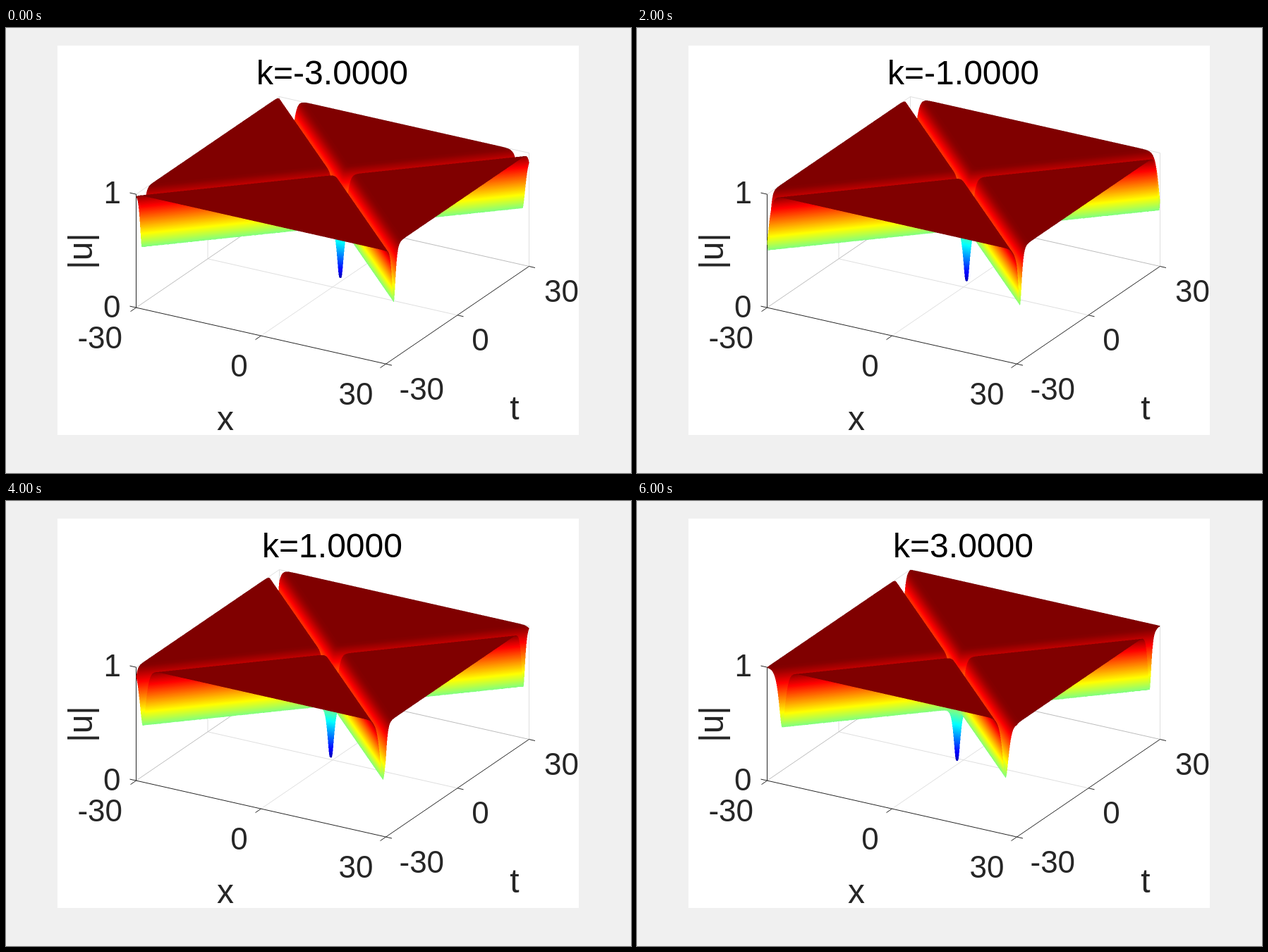
Write an HTML page with a canvas that moves like this. It is 886 px wide and 632 px high and loops after 6100 ms.

```html
<!DOCTYPE html>
<html>
<head>
<meta charset="utf-8">
<style>
html, body { margin: 0; width: 100%; height: 100%; overflow: hidden; background: #f0f0f0; }
canvas { display: block; }
</style>
</head>
<body>
<canvas id="stage" width="886" height="632"></canvas>
<script>
const ctx = document.getElementById('stage').getContext('2d');

// Orthographic view: pixels per unit of x, t and z around the floor centre
const CX = 463, CY = 367.8, R = 30;
const XX = 5.9, XY = 1.3333, TX = 3.3833, TY = -2.31, ZY = 161;
const project = (x, t, z = 0) => [CX + XX * x + TX * t, CY + XY * x + TY * t - ZY * z];

// Surface layer, rendered at double size for smooth edges
const SCALE = 2, LEFT = 180, TOP = 90, W = 566 * SCALE, H = 312 * SCALE;
const layer = document.createElement('canvas');
layer.width = W;
layer.height = H;
const layerCtx = layer.getContext('2d');
const image = layerCtx.createImageData(W, H);
const pixels = new Uint32Array(image.data.buffer);

const jet = Uint32Array.from({ length: 256 }, (_, i) => {
  const channel = peak => Math.round(255 * Math.max(0, Math.min(1, 1.5 - Math.abs(4 * i / 255 - peak))));
  return (255 << 24 | channel(1) << 16 | channel(2) << 8 | channel(3)) >>> 0;
});
const colour = z => jet[Math.max(0, Math.min(255, Math.round(z * 255)))];

// Height of two crossing dark solitons, from their exponentials
function height(e1, e2) {
  const p = e1 * e2 / 4, d = 1 + e1 + e2 + p;
  const re = (1 + p - (e1 + e2) / 2) / d, im = Math.sqrt(3) / 2 * (e1 - e2) / d;
  return Math.sqrt(re * re + im * im);
}

// Each screen column is a slice of the surface, painted from back to front
function renderSurface(k) {
  pixels.fill(0);
  const root3 = Math.sqrt(3), slope = -TX / XX;
  for (let col = 0; col < W; col++) {
    const dx = LEFT + (col + 0.5) / SCALE - CX;
    const back = Math.min(R, (dx + XX * R) / TX);
    const front = Math.max(-R, (dx - XX * R) / TX);
    if (back <= front) continue;
    const steps = Math.ceil((back - front) / 0.1), dt = (front - back) / steps;
    const x0 = (dx - TX * back) / XX;
    let e1 = Math.exp(root3 * (x0 - back - k - 0.6));
    let e2 = Math.exp(root3 * (x0 + back + k + 0.5));
    const r1 = Math.exp(root3 * (slope - 1) * dt), r2 = Math.exp(root3 * (slope + 1) * dt);
    const floor0 = CY + XY * x0 + TY * back - TOP, floorStep = (XY * slope + TY) * dt;
    let lastY, lastZ;
    for (let i = 0; i <= steps; i++, e1 *= r1, e2 *= r2) {
      const z = height(e1, e2), y = SCALE * (floor0 + floorStep * i - ZY * z);
      if (i) {
        const from = Math.floor(Math.min(y, lastY)), to = Math.floor(Math.max(y, lastY));
        const span = y - lastY;
        for (let row = from; row <= to; row++) {
          const f = Math.abs(span) < 1 ? 1 : Math.max(0, Math.min(1, (row + 0.5 - lastY) / span));
          pixels[row * W + col] = colour(lastZ + (z - lastZ) * f);
        }
      }
      lastY = y;
      lastZ = z;
    }
  }
  layerCtx.putImageData(image, 0, 0);
}

function path(stroke, ...points) {
  ctx.strokeStyle = stroke;
  ctx.beginPath();
  points.forEach(p => ctx.lineTo(...p));
  ctx.stroke();
}

function tick(point, dx, dy) {
  path('#262626', point, [point[0] + dx, point[1] + dy]);
}

function text(str, x, y, size = 44, align = 'center', fill = '#262626') {
  ctx.font = size + 'px "Liberation Sans", Arial, sans-serif';
  ctx.textAlign = align;
  ctx.fillStyle = fill;
  ctx.fillText(str, x, y);
}

function drawAxes() {
  const grid = '#dfdfdf', edge = '#bcbcbc', axis = '#262626';
  ctx.lineWidth = 1;
  path(grid, project(R, 0), project(-R, 0), project(-R, 0, 1));
  path(grid, project(0, -R), project(0, R), project(0, R, 1));
  path(grid, project(-R, -R, 1), project(-R, R, 1), project(R, R, 1), project(R, R));
  path(grid, project(-R, R), project(-R, R, 1));
  path(edge, project(-R, -R), project(-R, R), project(R, R));
  path(axis, project(-R, -R, 1), project(-R, -R), project(R, -R), project(R, R));
  for (const v of [-R, 0, R]) {
    tick(project(v, -R), -8, 5.5);
    tick(project(R, v), 8.5, 2);
  }
  for (const z of [0, 1]) tick(project(-R, -R, z), -9, -2);
}

function drawLabels(k) {
  text('k=' + k.toFixed(4), 462.5, 80, 48, 'center', '#000');
  text('1', 163, 249, 44, 'right');
  text('0', 162.5, 411, 44, 'right');
  text('-30', 165, 455, 44, 'right');
  text('0', 330.5, 495);
  text('30', 496, 535);
  text('-30', 557.5, 528, 44, 'left');
  text('0', 672.5, 458);
  text('30', 787.5, 389);
  text('x', 311, 571, 48);
  text('t', 721, 556, 48);
  ctx.save();
  ctx.translate(121.5, 317);
  ctx.rotate(-Math.PI / 2);
  text('|u|', 0, 0, 48);
  ctx.restore();
}

function draw(k) {
  ctx.fillStyle = '#f0f0f0';
  ctx.fillRect(0, 0, 886, 632);
  ctx.fillStyle = '#fff';
  ctx.fillRect(73, 25, 739, 553);
  drawAxes();
  renderSurface(k);
  ctx.drawImage(layer, LEFT, TOP, W / SCALE, H / SCALE);
  drawLabels(k);
}

let shown = -1;
function loop() {
  const step = Math.floor(performance.now() % 6100 / 100);
  if (step !== shown) draw((step - 30) / 10);
  shown = step;
  requestAnimationFrame(loop);
}
loop();
</script>
</body>
</html>
```
